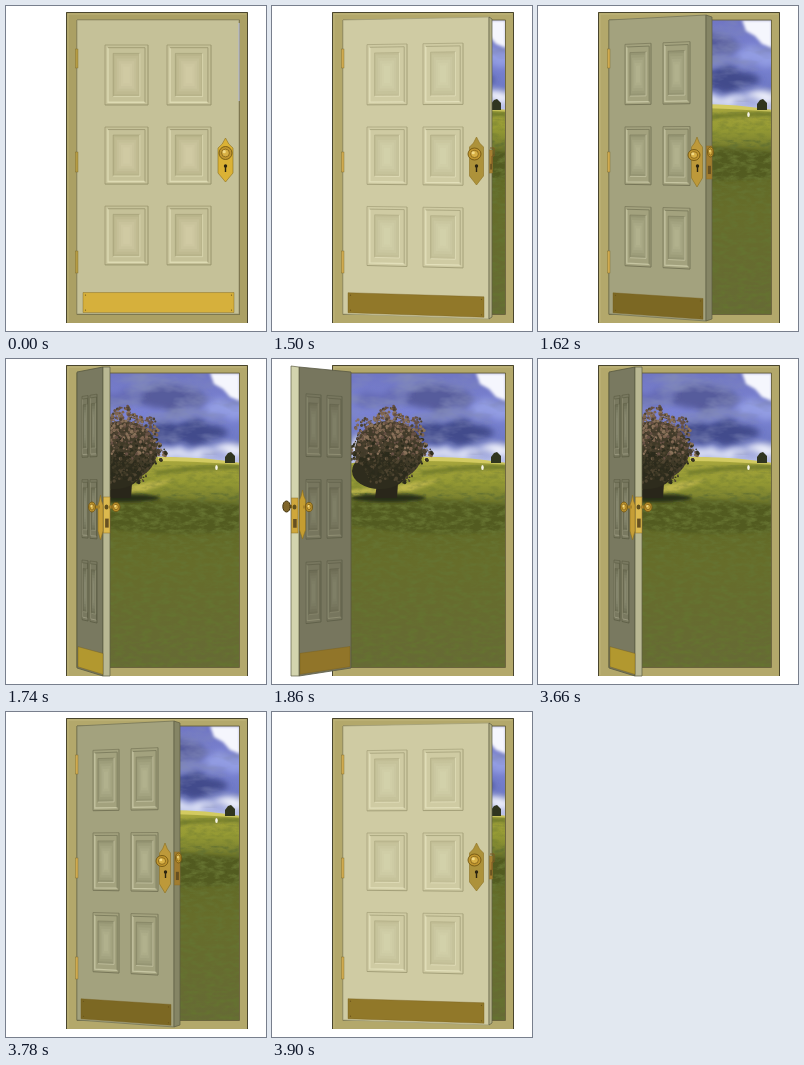
Write an HTML page that moves like this. It is 260x325 px and loops after 4020 ms.

```html
<!DOCTYPE html>
<html lang="en">
<head>
<meta charset="utf-8">
<title>Opening door</title>
<style>
html, body { margin: 0; width: 100%; height: 100%; overflow: hidden; background: #fff; }
svg { display: block; width: 100vw; height: 100vh; }
</style>
</head>
<body>
<svg viewBox="0 0 260 325">
  <defs>
    <clipPath id="opening"><rect x="71" y="14" width="163" height="295"/></clipPath>
    <filter id="cloud" x="-50%" y="-80%" width="200%" height="260%">
      <feGaussianBlur stdDeviation="4"/>
      <feTurbulence type="fractalNoise" baseFrequency=".05 .08" numOctaves="3" seed="4" result="noise"/>
      <feDisplacementMap in2="noise" in="SourceGraphic" scale="16" xChannelSelector="R" yChannelSelector="G"/>
      <feGaussianBlur stdDeviation="3"/>
    </filter>
    <filter id="fuzzy" x="-50%" y="-50%" width="200%" height="200%"><feGaussianBlur stdDeviation="1.5"/></filter>
    <filter id="turf" x="0" y="0" width="100%" height="100%">
      <feTurbulence type="fractalNoise" baseFrequency=".11 .24" numOctaves="4" seed="8"/>
      <feColorMatrix values="0 0 0 0 .13  0 0 0 0 .17  0 0 0 0 .03  2.600 0 0 0 -1.050"/>
    </filter>
    <filter id="billow" x="0" y="0" width="100%" height="100%">
      <feTurbulence type="fractalNoise" baseFrequency=".025 .06" numOctaves="4" seed="3"/>
      <feColorMatrix values="0 0 0 0 .22  0 0 0 0 .25  0 0 0 0 .48  2.200 0 0 0 -.95"/>
    </filter>
    <linearGradient id="sky" x2="0" y2="1">
      <stop stop-color="#7076c2"/><stop offset=".4" stop-color="#7b83d4"/>
      <stop offset=".72" stop-color="#6d78c4"/><stop offset="1" stop-color="#d5daf6"/>
    </linearGradient>
    <linearGradient id="grass" x2="0" y2="1">
      <stop stop-color="#aaa83f"/><stop offset=".12" stop-color="#959a34"/>
      <stop offset=".19" stop-color="#7d8430"/><stop offset=".24" stop-color="#5f6724"/>
      <stop offset=".5" stop-color="#666d2a"/><stop offset="1" stop-color="#666a35"/>
    </linearGradient>
  </defs>
  <g id="scene" clip-path="url(#opening)"></g>
  <g id="frame"></g>
  <g id="door"></g>
</svg>
<script>
const $ = id => document.getElementById(id);
const lerp = (a, b, k) => a + (b - a) * k;

function randomizer(seed) {
  return () => (seed = (seed * 16807) % 2147483647) / 2147483647;
}

const rect = (x, y, w, h, fill, extra = '') =>
  `<rect x="${x}" y="${y}" width="${w}" height="${h}" fill="${fill}" ${extra}/>`;
const oval = (x, y, rx, ry, fill, extra = '') =>
  `<ellipse cx="${x}" cy="${y}" rx="${rx}" ry="${ry}" fill="${fill}" ${extra}/>`;
const path = (d, fill, extra = '') => `<path d="${d}" fill="${fill}" ${extra}/>`;

function clouds() {
  const cloud = (x, y, rx, ry, fill) => oval(x, y, rx, ry, fill, 'filter="url(#cloud)"');
  return rect(71, 14, 163, 96, 'url(#sky)') +
    cloud(165, 38, 34, 13, '#565c9c') +
    cloud(112, 40, 26, 8, '#666cb6') +
    cloud(180, 73, 44, 11, '#434c8c') +
    cloud(218, 50, 20, 9, '#929ce2') +
    rect(71, 14, 163, 82, '#000', 'filter="url(#billow)"') +
    cloud(86, 88, 12, 9, '#e6e9fa') +
    cloud(180, 94, 24, 5, '#e3e7f8') +
    cloud(222, 90, 20, 6, '#eef0fb') +
    path('M204 14H234V42L224 38L217 30L208 25Z', '#f5f6fd', 'filter="url(#fuzzy)"');
}

function meadow() {
  return path('M71 106Q120 95 160 98T234 104V309H71Z', 'url(#grass)') +
    path('M152 98Q195 97 234 104V106Q190 102 152 102Z', '#d3cb61') +
    path('M150 112Q190 105 234 106V110Q190 110 150 116Z', '#767f2c', 'filter="url(#fuzzy)"') +
    path('M71 132Q120 126 170 120L140 132L71 138Z', '#bdb64c', 'filter="url(#fuzzy)"') +
    path('M71 143Q150 134 234 146V172Q150 180 71 165Z', '#454f1b', 'filter="url(#fuzzy)" opacity=".5"') +
    rect(71, 134, 163, 175, '#000', 'filter="url(#turf)"') +
    rect(71, 106, 163, 28, '#000', 'filter="url(#turf)" opacity=".35"');
}

function trees() {
  const rand = randomizer(19);
  const sunny = ['#7d6450', '#665044', '#8a725a', '#4d4231'];
  const shady = ['#33301f', '#3f3a27', '#2b2b1c', '#4e4430'];
  let out = oval(116, 139, 38, 4, '#262d12', 'filter="url(#fuzzy)"') +
    path('M100 112H134L126 124L125 139H103L105 124Z', '#29261a') +
    oval(117, 92, 34, 30, '#423b2a') + oval(108, 112, 28, 18, '#2e2c1d');
  for (let i = 0; i < 950; i++) {
    const angle = rand() * Math.PI * 2, reach = Math.sqrt(rand()) * (.9 + .1 * Math.sin(angle * 7));
    const x = 118 + Math.cos(angle) * reach * 43, y = 87 + Math.sin(angle) * reach * 41;
    const tones = y + rand() * 30 < 104 ? sunny : shady;
    const r = .6 + rand() * 1.2;
    out += oval(x.toFixed(1), y.toFixed(1), r.toFixed(1), r.toFixed(1), tones[i % 4]);
  }
  return out + path('M219 104V98L222 94L225 93L229 97V104Z', '#30351f') +
    oval(210.5, 108.5, 1.3, 2.5, '#f6f4e6');
}

function frame(closed) {
  const wood = closed ? '#aba064' : '#b3a86b';
  return path('M60 6H242V317H60ZM71 14V308.500H233V14Z', wood, 'fill-rule="evenodd"') +
    path('M60.500 317V6.500H241.500V317', 'none', 'stroke="#49452d"') +
    path('M62 316V8H240', 'none', 'stroke="#c5bb82" stroke-width=".7"') +
    path('M71 14V308.500H233.500V14Z', 'none', 'stroke="#68613b" stroke-width=".9"');
}

// Each pose gives the face from hinge to free side, and the edge thickness.
const poses = [
  { hinge: [71, 14, 308], free: [233, 14, 308], edge: 0, columns: [[99, 142], [161, 205]],
    kick: [77, 228], face: '#c5c198', light: '#dedbb4', dark: '#98946c', brass: '#d6b03c', side: '#aaa677' },
  { hinge: [71, 14, 308], free: [217, 11, 313], edge: 3, columns: [[95, 135], [151, 191]],
    kick: [76, 212], face: '#cfcba3', light: '#e2dfba', dark: '#a4a079', brass: '#917829', side: '#b2af86' },
  { hinge: [71, 14, 308], free: [168, 9, 315], edge: 6, columns: [[87, 113], [125, 152]],
    kick: [75, 165], face: '#a3a27e', light: '#c6c5a2', dark: '#777658', brass: '#7c6823', side: '#858565' },
  { hinge: [71, 13, 309], free: [97, 8, 317], edge: 7, columns: [[76, 82], [84, 91]],
    kick: [72, 97], face: '#797960', light: '#9b9a80', dark: '#57583f', brass: '#b2982f', side: '#b9b893' },
  { hinge: [79, 13, 309], free: [27, 8, 317], edge: -8, columns: [[34, 49], [55, 70]],
    kick: [28, 78], face: '#77765e', light: '#929176', dark: '#585943', brass: '#917529', side: '#d3d4ae' }
];
const rows = [[.085, .289], [.364, .558], [.633, .833]];

function onFace(p, x, v) {
  const k = (x - p.hinge[0]) / (p.free[0] - p.hinge[0]);
  return [x.toFixed(2), lerp(lerp(p.hinge[1], p.free[1], k), lerp(p.hinge[2], p.free[2], k), v).toFixed(2)];
}

function corners(p, x1, x2, v1, v2) {
  return [onFace(p, x1, v1), onFace(p, x2, v1), onFace(p, x2, v2), onFace(p, x1, v2)];
}

const polygon = (points, fill, extra = '') =>
  `<polygon points="${points.map(q => q.join()).join(' ')}" fill="${fill}" ${extra}/>`;

// A moulded border around a field that brightens in steps toward its centre.
function panel(p, [x1, x2], [v1, v2]) {
  const w = x2 - x1, h = v2 - v1;
  const ring = (a, b) => corners(p, x1 + w * a, x2 - w * a, v1 + h * b, v2 - h * b);
  const line = (q, ids, colour, width) =>
    `<polyline points="${ids.map(i => q[i].join()).join(' ')}" fill="none" stroke="${colour}" stroke-width="${width}"/>`;
  const thin = w < 20 ? .7 : 1;
  const outer = ring(0, 0), lip = ring(.07, .045), field = ring(.19, .14);
  const steps = [0, 1, 2, 3, 4].map(i =>
    polygon(ring(.22 + i * .05, .18 + i * .045), p.light, 'opacity=".16"')).join('');
  return polygon(outer, p.face) +
    line(lip, [0, 3, 2], p.light, thin * 1.3) + line(lip, [0, 1, 2], p.dark, thin * .8) +
    line(outer, [3, 0, 1], p.dark, thin * .7) + line(outer, [1, 2, 3], p.dark, thin) +
    polygon(field, p.dark, 'opacity=".3"') + steps +
    line(field, [3, 0, 1], p.dark, thin * .5) + line(field, [1, 2, 3], p.light, thin * .8);
}

function lockPlate(x, top, bottom, w, fill) {
  const l = x - w / 2, r = x + w / 2, n = w * .22;
  return path(`M${x} ${top}L${x + n} ${top + 6}L${r} ${top + 10}V${bottom - 9}L${x + n} ${bottom - 4}L${x} ${bottom}` +
    `L${x - n} ${bottom - 4}L${l} ${bottom - 9}V${top + 10}L${x - n} ${top + 6}Z`, fill,
    'stroke="#8c7020" stroke-width=".6"');
}

const knob = (x, y, rx, ry) =>
  oval(x, y, rx, ry, '#c0962f', 'stroke="#735713" stroke-width=".9"') +
  oval(x, y, rx * .6, ry * .6, '#d8b045', 'stroke="#806019" stroke-width=".8"') +
  oval(x - rx * .2, y - ry * .2, rx * .25, ry * .25, '#f2d985');
const keyhole = (x, y) => oval(x, y, 1.7, 1.8, '#2b2410') + rect(x - .7, y, 1.4, 6, '#2b2410');
const stem = (x, y, w) => rect(x, y - 1.5, w, 3, '#a88329');
const bolt = (x, y, w, h, fill) => rect(x, y, w, h, fill, 'stroke="#8a6d24" stroke-width=".5"') +
  rect(x + w * .25, y + h * .6, w * .55, h * .25, '#665021');

const locks = [
  () => lockPlate(219.5, 132, 176, 15, '#dbb235') + knob(219.5, 147, 6.5, 6.5) + keyhole(219.5, 160),
  () => bolt(217.5, 144, 3, 23, '#a78032') + path('M218 142H222V150H220V158', 'none', 'stroke="#7c5b24"') +
    lockPlate(204.5, 131, 179, 14, '#ad923a') + knob(202.5, 148, 6.5, 6) + keyhole(204.5, 160),
  () => bolt(168.5, 140, 5.5, 33, '#a17c2f') + knob(172.5, 146, 3, 5) +
    lockPlate(159, 131, 181, 11, '#bd993a') + knob(156, 149, 6, 5.5) + keyhole(159.5, 160),
  () => lockPlate(94.5, 136, 181, 5, '#c59e37') + bolt(97.5, 138, 6.5, 36, '#dcb94e') +
    oval(100.5, 148, 2, 2.5, '#60501e') +
    stem(87, 148, 7) + knob(86, 148, 3.5, 5) + stem(103, 148, 6) + knob(110, 148, 4, 4.5),
  () => lockPlate(30.5, 131, 180, 6, '#c59d30') + bolt(19.5, 139, 6.5, 35, '#cfa73c') +
    oval(22.5, 148, 2, 2.5, '#60501e') +
    stem(31, 148, 6) + knob(37, 148, 3.5, 4.5) + rect(16, 146, 4, 3, '#79601f') +
    oval(14.5, 147.5, 3.7, 5.5, '#80662a', 'stroke="#443611"')
];

function hinges(n) {
  if (n > 2) return '';
  return [[43, 19], [146, 20], [245, 22]].map(([y, h]) =>
    rect(69.5, y, 2.5, h, n ? '#d0aa4f' : '#b59b43', 'stroke="#7c682b" stroke-width=".4"')).join('');
}

function door(n) {
  const p = poses[n], [x, top, bottom] = p.free;
  const face = corners(p, p.hinge[0], x, 0, 1);
  const plate = corners(p, ...p.kick, .927, .995);
  const screws = n > 2 ? '' : plate.map(([a, b], i) =>
    oval(+a + (i % 3 ? -2.5 : 2.5), +b + (i < 2 ? 2.5 : -2.5), .6, .6, '#69531a')).join('');
  const rise = n > 2 ? 0 : 2;
  const edge = p.edge ? polygon([[x, top], [x + p.edge, top + rise - (n === 4 ? 1 : 0)],
    [x + p.edge, bottom - rise], [x, bottom]], p.side, 'stroke="#5d5c43" stroke-width=".7"') : '';
  const panels = p.columns.map(c => rows.map(r => panel(p, c, r)).join('')).join('');
  const sliver = n ? '' : path('M233 17V95', 'none', 'stroke="#c0c7e0" stroke-width="1.1"');
  return polygon(face, p.face, `stroke="${p.dark}" stroke-width=".8"`) + edge + panels +
    polygon(plate, p.brass, 'stroke="#765e1e" stroke-width=".4"') + screws +
    sliver + hinges(n) + locks[n]();
}

$('scene').innerHTML = clouds() + meadow() + trees();
const doors = poses.map((_, n) => door(n));
const schedule = [[1500, 0], [1620, 1], [1740, 2], [1860, 3], [3660, 4], [3780, 3], [3900, 2], [4020, 1]];
let shown = -1;

function update(time) {
  const t = time % 4020;
  const n = schedule.find(([end]) => t < end)[1];
  if (n === shown) return;
  shown = n;
  $('frame').innerHTML = frame(n === 0);
  $('door').innerHTML = doors[n];
}

const start = performance.now();
function tick() {
  update(performance.now() - start);
  requestAnimationFrame(tick);
}
tick();
</script>
</body>
</html>
```
